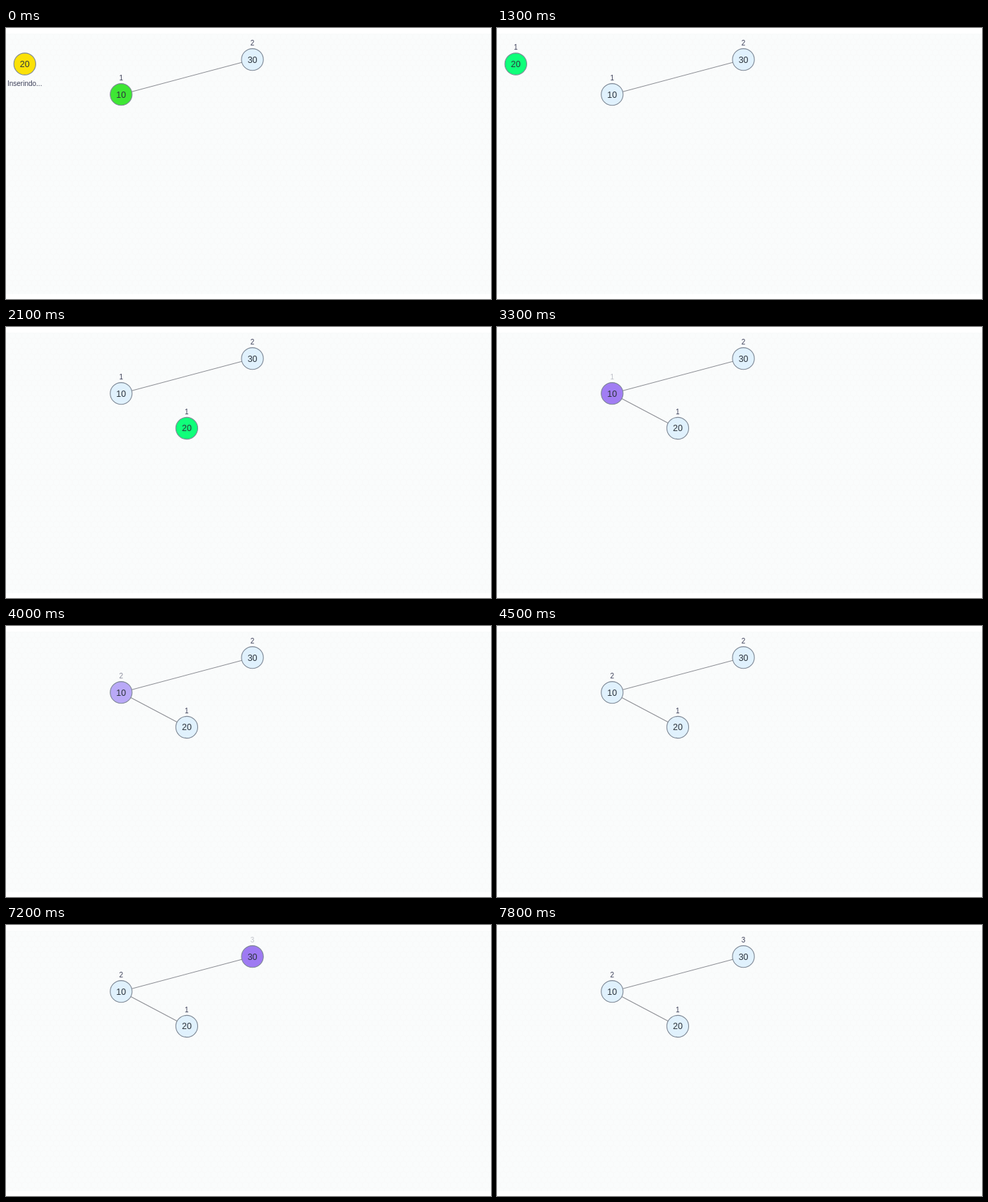
An HTML page that plays this animation: 692 px wide and 388 px high, repeating every 8 s.

```html
<!DOCTYPE html>
<html lang="pt">
<head>
<meta charset="utf-8">
<title>Inserção em árvore</title>
<style>
  html, body { margin: 0; width: 100%; height: 100%; overflow: hidden; background: #fff; }
  svg { display: block; width: 100%; height: 100%; }
  text { font-family: "Liberation Sans", Arial, sans-serif; text-anchor: middle; }
  .node circle { stroke: #7d8794; stroke-width: 1.1; }
  .value { font-size: 12.5px; fill: #2c343c; }
  .label { font-size: 10px; fill: #3c3f58; }
  .edge { stroke: #8c8e94; stroke-width: 1.1; }
</style>
</head>
<body>
<svg id="stage" viewBox="0 0 692 388">
  <defs>
    <pattern id="hex" width="9" height="15" patternUnits="userSpaceOnUse">
      <path d="M0 2.5L4.5 0L9 2.5V7.5L4.5 10L0 7.5ZM4.5 10V15" fill="none" stroke="#f7f9f9" stroke-width=".8"/>
    </pattern>
  </defs>
  <rect y="8" width="692" height="373" fill="#fafcfc"/>
  <rect y="8" width="692" height="373" fill="url(#hex)"/>
</svg>
<script>
const LOOP = 8000, STEP = 100;
const BASE = [224, 241, 253], GREEN = [62, 230, 52], SPRING = [16, 255, 122],
      YELLOW = [251, 225, 8], PURPLE = [131, 72, 238];
const A = [164.3, 95.2], B = [351.6, 45.2], C = [257.9, 145], START = [26.8, 51.5];

const stage = document.getElementById('stage');

function add(parent, tag, attrs, text = '') {
  const el = document.createElementNS('http://www.w3.org/2000/svg', tag);
  for (const k in attrs) el.setAttribute(k, attrs[k]);
  el.textContent = text;
  parent.appendChild(el);
  return el;
}

function makeEdge([x1, y1], [x2, y2]) {
  return add(stage, 'line', { class: 'edge', x1, y1, x2, y2 });
}

function makeNode(value) {
  const g = add(stage, 'g', { class: 'node' });
  const circle = add(g, 'circle', { r: 15.6 });
  add(g, 'text', { class: 'value', y: 4.3 }, value);
  const label = add(g, 'text', { class: 'label', y: -20.2 });
  return { g, circle, label };
}

function setNode(node, [x, y], fill, label, opacity = 1) {
  node.g.setAttribute('transform', `translate(${x} ${y})`);
  node.circle.setAttribute('fill', `rgb(${fill.map(Math.round)})`);
  node.label.textContent = label;
  node.label.setAttribute('opacity', opacity);
}

const mix = (a, b, k) => a.map((v, i) => v + (b[i] - v) * k);
const clamp = v => Math.min(1, Math.max(0, v));

// cubic-bezier(.25, .1, .25, 1)
function ease(x) {
  if (x <= 0 || x >= 1) return clamp(x);
  const curve = (p, q, u) => 3 * p * u * (1 - u) ** 2 + 3 * q * u * u * (1 - u) + u ** 3;
  let lo = 0, hi = 1;
  for (let i = 0; i < 24; i++) {
    const mid = (lo + hi) / 2;
    if (curve(.25, .25, mid) < x) lo = mid; else hi = mid;
  }
  return curve(.1, 1, lo);
}

// Rises to 1 and falls back, easing each half
function pulse(t, start, half = 750) {
  const p = (t - start) / half;
  return p < 1 ? ease(clamp(p)) : 1 - ease(clamp(p - 1));
}

makeEdge(A, B);
const newEdge = makeEdge(A, C);
const ten = makeNode('10'), thirty = makeNode('30'), twenty = makeNode('20');
const status = add(stage, 'text', { class: 'label', x: 26.7, y: 83 }, 'Inserindo...');

function draw(t) {
  const p10 = pulse(t, 3000), p30 = pulse(t, 6300);
  setNode(ten, A, t < 500 ? GREEN : mix(BASE, PURPLE, p10), t < 3750 ? '1' : '2', 1 - p10);
  setNode(thirty, B, mix(BASE, PURPLE, p30), t < 7050 ? '2' : '3', 1 - p30);

  const waiting = t < 1300, linked = t >= 3000;
  setNode(twenty, mix(START, C, ease((t - 1300) / 800)),
    waiting ? YELLOW : linked ? BASE : SPRING, waiting ? '' : '1');
  status.setAttribute('visibility', waiting ? 'visible' : 'hidden');
  newEdge.setAttribute('visibility', linked ? 'visible' : 'hidden');
}

const begin = performance.now();
function tick() {
  const t = (performance.now() - begin) % LOOP;
  draw(Math.floor(t / STEP) * STEP);
  requestAnimationFrame(tick);
}
tick();
</script>
</body>
</html>
```
